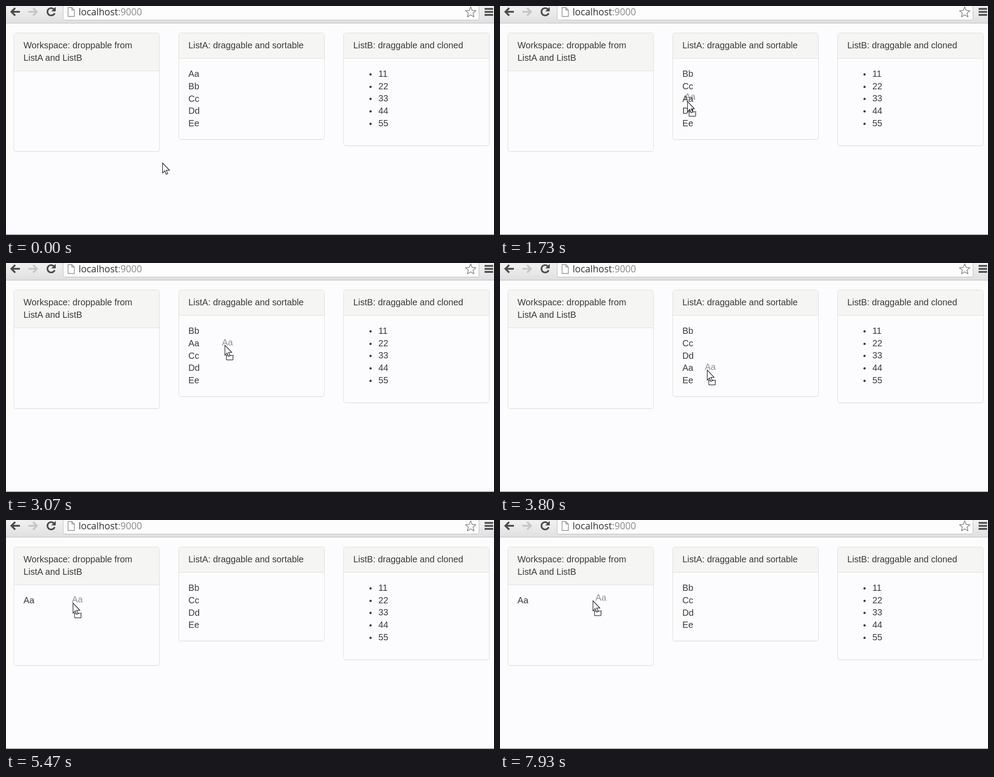
Write an HTML page that moves like this. It is 1089 px wide and 514 px high and loops after 8 s.

```html
<!DOCTYPE html>
<html lang="en">
<head>
<meta charset="utf-8">
<title>Drag and drop lists</title>
<style>
  html, body { margin: 0; width: 100%; height: 100%; overflow: hidden; }
  body {
    position: relative; background: #fcfcfe; color: #3a3a3a;
    font: 19.8px/27.8px "Liberation Sans", Arial, sans-serif;
  }
  #chrome { position: absolute; left: 0; top: 0; }
  #chrome text { font: 21px "Open Sans", "Noto Sans", sans-serif; }
  .panel {
    position: absolute; top: 60px; width: 326px; box-sizing: border-box;
    border: 1px solid #dcdcd6; border-radius: 5.6px;
    box-shadow: 0 1px 1px rgba(0, 0, 0, .05);
  }
  .panel h3 {
    margin: 0; padding: 14px 21px; font: inherit; background: #f5f5f3;
    border-bottom: 1px solid #dcdcd6; border-radius: 4.6px 4.6px 0 0;
  }
  #work { left: 17px; height: 267px; }
  #listA { left: 385px; height: 240px; }
  #listA.short { height: 212px; }
  #listB { left: 753px; height: 254px; }
  ul { margin: 21px; padding: 0 0 0 56px; list-style: none; }
  li { position: relative; }
  li::before {
    content: ""; position: absolute; left: -20px; top: 12px;
    width: 5px; height: 5px; border-radius: 50%; background: #3a3a3a;
  }
  .item, #ghost, #cursor { position: absolute; left: 0; top: 0; white-space: nowrap; }
  #ghost { opacity: .55; }
  #cursor { overflow: visible; }
  #edge { position: absolute; left: 0; right: 0; top: 513px; height: 1px; background: #606060; }
</style>
</head>
<body>
<svg id="chrome" width="1089" height="39">
  <defs>
    <linearGradient id="bar" x2="0" y2="1">
      <stop stop-color="#f1f1f1"/><stop offset="1" stop-color="#e0e0e0"/>
    </linearGradient>
  </defs>
  <rect width="1089" height="39" fill="url(#bar)"/>
  <rect y="38" width="1089" height="1" fill="#b4b4b4"/>
  <rect x="127.5" y="-8.5" width="928" height="40" rx="3" fill="#fdfdfe" stroke="#b6b6b6"/>
  <g fill="none" stroke="#4c4c4c" stroke-width="4">
    <path d="M31 13H13M20.5 4.500L12 13l8.500 8.500"/>
    <path d="M50 13H68M60.500 4.500L69 13l-8.500 8.500" stroke="#c6c6c6"/>
    <path d="M107 7.500A8.300 8.300 0 1 0 108.500 16" stroke-width="3.600"/>
    <path d="M1068 6.500h19m-19 6.800h19m-19 6.800h19"/>
  </g>
  <path d="M111 2V12H101Z" fill="#4c4c4c"/>
  <path d="M138.500 3.500H147L152.500 9V23.500H138.500ZM147 3.500V9H152.500" fill="#fff" stroke="#858585" stroke-width="1.400"/>
  <text x="162" y="20.500" fill="#333">localhost<tspan fill="#8a8a8a">:9000</tspan></text>
  <path d="M1037 2L1040.300 10 1048.500 10.600 1042.200 16 1044.300 24.300 1037 19.800 1029.700 24.300 1031.800 16 1025.500 10.600 1033.700 10Z"
        fill="#fff" stroke="#7d7d7d" stroke-width="1.500" stroke-linejoin="round"/>
</svg>

<div class="panel" id="work"><h3>Workspace: droppable from ListA and ListB</h3></div>
<div class="panel" id="listA"><h3>ListA: draggable and sortable</h3></div>
<div class="panel" id="listB">
  <h3>ListB: draggable and cloned</h3>
  <ul><li>11</li><li>22</li><li>33</li><li>44</li><li>55</li></ul>
</div>
<div id="edge"></div>

<div id="ghost">Aa</div>
<svg id="cursor" width="24" height="40">
  <g id="drop">
    <rect x="4" y="23.500" width="14.500" height="10" fill="#fff" stroke="#fff" stroke-width="3"/>
    <rect x="4" y="23.500" width="14.500" height="10" fill="none" stroke="#222" stroke-width="2.400" stroke-dasharray="1.600 1.200"/>
  </g>
  <path d="M.5 .5V23L5.300 18 8.800 25.800 12 24.300 8.600 16.700H15.800Z" fill="#fff" stroke="#1c1c1c" stroke-width="1.300"/>
</svg>

<script>
const LOOP = 8000, STEP = 1000 / 15, GRAB = 730, SWAP = 150;
const ROW = 27.8, TOP = 139, AWAY = -1;
const WORK_RIGHT = 343, LIST_LEFT = 385;
const names = ['Aa', 'Bb', 'Cc', 'Dd', 'Ee'];
const $ = id => document.getElementById(id);
const ghost = $('ghost'), cursor = $('cursor'), drop = $('drop'), listA = $('listA');
const clamp = (v, lo, hi) => Math.max(lo, Math.min(hi, v));

// Turning points of the pointer
const path = [
  { t: 0, x: 349, y: 352 },
  { t: GRAB, x: 412, y: 160 },
  { t: 1733, x: 418, y: 214 },
  { t: 2150, x: 432, y: 238 },
  { t: 3067, x: 488, y: 184 },
  { t: 3700, x: 462, y: 240 },
  { t: 4100, x: 462, y: 240 },
  { t: 4380, x: 463, y: 165 },
  { t: 5467, x: 149, y: 186 },
  { t: 6500, x: 440, y: 190 },
  { t: 6890, x: 469, y: 164 },
  { t: 7000, x: 470, y: 168 },
  { t: 7933, x: 207, y: 181 },
  { t: LOOP, x: 202, y: 181 }
];

// Monotone cubic: the pointer rests wherever it turns back
function slope(i, axis) {
  if (i < 1 || i > path.length - 2) return 0;
  const rate = k => (path[k + 1][axis] - path[k][axis]) / (path[k + 1].t - path[k].t);
  const a = rate(i - 1), b = rate(i);
  return a * b > 0 ? 2 * a * b / (a + b) : 0;
}

function pointer(t) {
  const i = Math.max(0, path.findIndex(p => p.t > t) - 1);
  const p = path[i], q = path[i + 1], span = q.t - p.t;
  const u = (t - p.t) / span, v = 1 - u;
  const at = axis =>
    v * v * ((1 + 2 * u) * p[axis] + u * span * slope(i, axis)) +
    u * u * ((3 - 2 * u) * q[axis] - v * span * slope(i + 1, axis));
  return { x: at('x'), y: at('y') };
}

// The drag image and the drop test trail the pointer by one step
const dragPoint = t => pointer(Math.max(GRAB, t - STEP));

function hoverIndex(t, current) {
  const { x, y } = dragPoint(t);
  if (x < WORK_RIGHT) return AWAY;
  if (x < LIST_LEFT) return current;
  return clamp(Math.floor((y - TOP) / ROW), 0, names.length - 1);
}

// Follow the drag once to find when the dragged row changes place
const moves = [];
for (let t = GRAB, index = 0; t < LOOP; t += 10) {
  const next = hoverIndex(t, index);
  if (next !== index) moves.push({ at: t, index: next });
  index = next;
}

const items = names.map(name => {
  const el = document.createElement('div');
  el.className = 'item';
  el.textContent = name;
  document.body.insertBefore(el, ghost);
  return el;
});

// Row of an item while the first item sits at index
function slotY(item, index) {
  if (item === 0) return TOP + ROW * (index === AWAY ? 1 : index);
  const pushed = index !== AWAY && item > index;
  return TOP + ROW * (pushed ? item : item - 1);
}

const rowY = (row, t) => row.from + (row.to - row.from) * clamp((t - row.at) / SWAP, 0, 1);

function layout(t) {
  const rows = names.map((_, i) => ({ from: slotY(i, 0), to: slotY(i, 0), at: 0 }));
  let index = 0;
  for (const move of moves.filter(m => m.at <= t)) {
    const snap = index === AWAY || move.index === AWAY;
    rows.forEach((row, i) => {
      const to = slotY(i, move.index);
      if (to === row.to && !snap) return;
      Object.assign(row, { from: snap ? to : rowY(row, move.at), to, at: move.at });
    });
    index = move.index;
  }
  return { rows, away: index === AWAY };
}

const place = (el, x, y) => el.style.transform = `translate(${Math.round(x)}px, ${Math.round(y)}px)`;

function draw(t) {
  const { rows, away } = layout(t);
  rows.forEach((row, i) => place(items[i], i === 0 && away ? 39 : 407, rowY(row, t)));
  listA.classList.toggle('short', away);

  const tip = pointer(t), drag = dragPoint(t);
  place(cursor, tip.x, tip.y);
  place(ghost, drag.x - 5, drag.y - 20);
  ghost.style.visibility = drop.style.visibility = t >= GRAB ? 'visible' : 'hidden';
}

function tick() {
  const t = performance.now() % LOOP;
  draw(Math.floor((t + 4) / STEP) * STEP % LOOP);
  requestAnimationFrame(tick);
}
tick();
</script>
</body>
</html>
```
